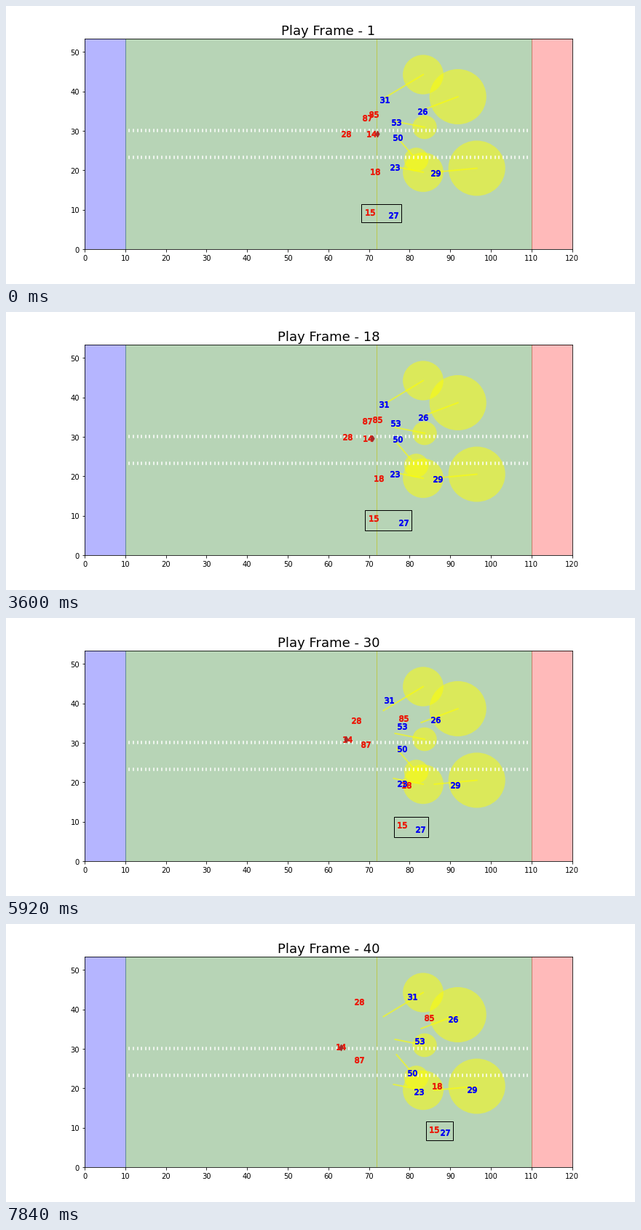
Write a matplotlib script that moves like this. It is 864 px wide and 383 px high and loops after 8000 ms.

```python
import numpy as np
import matplotlib.pyplot as plt
from matplotlib.animation import FuncAnimation
from matplotlib.patches import Circle, Rectangle
from matplotlib.transforms import ScaledTranslation

W, H, DPI = 864, 383, 72
LEFT, BASE, FIELD_W, FIELD_H = 108, 335.03, 669.6, 289.73
YARDS_X, YARDS_Y = 120, 53.3

TICK, TICKS = 80, 100            # ms per drawn frame, drawn frames per loop
HOLD, STEP = 480, 192.8          # time on the first play frame, then per frame
SNAP, LAST, EASE = 15, 40, 1.357

RED, BLUE = "#ea1c0c", "#0606f2"

# Stage points for each route: before the snap, halfway, end
ROUTES = {
    87: ((495.5, 154), (493.5, 174), (484.5, 187)),
    85: ((504.5, 149), (546.5, 138), (580.5, 129)),
    28: ((466.5, 176), (481.5, 141), (484.5, 107)),
    14: ((501.5, 176), (468.5, 167), (459.5, 169)),
    18: ((506.5, 228), (550.5, 230), (591.5, 223)),
    15: ((499.5, 283.5), (544.5, 285.2), (588.2, 283)),
    31: ((519.5, 128.5), (526.5, 113), (558, 100)),
    26: ((571.5, 145), (590.5, 140), (613.5, 131)),
    53: ((535.5, 160), (544.5, 149), (567.5, 161)),
    50: ((537.5, 181), (544.5, 180), (557.5, 205)),
    23: ((533.5, 222), (544.5, 228), (566.5, 231)),
    29: ((589.5, 230), (617.5, 230), (639.5, 228)),
    27: ((532, 287.5), (569, 291.2), (603.2, 287)),
}
BALL = ((510, 176), (467, 167), (459.5, 169.5))

# Drift of the players who move before the snap
SHIFTS = {87: (1, -8), 53: (-1, -5), 50: (0, -5), 27: (11.5, 2)}

# Defender: zone centre on the stage, radius in yards
ZONES = {
    31: ((573, 94.5), 5),
    26: ((620.7, 125), 7),
    53: ((575, 167), 3),
    50: ((563.5, 211.5), 3),
    23: ((573, 229), 5),
    29: ((646.7, 223.5), 7),
}


def to_yards(point):
    x, y = point
    return np.array([(x - LEFT) * YARDS_X / FIELD_W,
                     (BASE - y) * YARDS_Y / FIELD_H])


def position(route, n, shift=(0, 0)):
    """Drift until the snap, then run a speeding-up quadratic curve."""
    start, middle, end = np.array(route, float)
    start = start + np.array(shift) * min((n - 1) / (SNAP - 1), 1)
    control = 2 * middle - (start + end) / 2
    u = max(0, (n - SNAP) / (LAST - SNAP)) ** EASE
    return to_yards((1 - u) ** 2 * start + 2 * u * (1 - u) * control
                    + u * u * end)


def player(number, n):
    return position(ROUTES[number], n, SHIFTS.get(number, (0, 0)))


def play_frame(tick):
    late = tick * TICK - HOLD
    return 1 if late < 0 else 2 + int(late // STEP)


def draw_field(ax):
    for start, end, color in ((0, 10, "#0a0aff"), (10, 110, "#12730f"),
                              (110, 120, "#ff1c1c")):
        ax.add_patch(Rectangle((start, 0), end - start, YARDS_Y,
                               color=color, alpha=0.3, lw=1, zorder=0.5))
    ax.axvline(71.8, color="y", lw=1, alpha=0.55, zorder=1)
    marks = np.arange(11, 110)
    for low, high in ((22.91, 23.57), (29.73, 30.39)):
        ax.vlines(marks, low, high, color="white", lw=1.5,
                  capstyle="projecting", zorder=2.5)


def draw_zones(ax):
    for number, (center, radius) in ZONES.items():
        start = to_yards(np.array(ROUTES[number][0]) - 1)
        center = to_yards(center)
        ax.add_patch(Circle(center, radius, fc="yellow", ec="none",
                            alpha=0.5, zorder=2))
        ax.plot(*zip(start, center), color="yellow", lw=2, alpha=0.6,
                zorder=2.2)


fig = plt.figure(figsize=(W / DPI, H / DPI), dpi=DPI, facecolor="white")
ax = fig.add_axes([LEFT / W, 1 - BASE / H, FIELD_W / W, FIELD_H / H])
ax.set(xlim=(0, YARDS_X), ylim=(0, YARDS_Y),
       xticks=range(0, 121, 10), yticks=range(0, 51, 10))
ax.tick_params(labelsize=10)
title = ax.set_title("", fontsize=18)

# All lettering sits a fraction of a pixel low.
drop = ScaledTranslation(0, -0.76 / DPI, fig.dpi_scale_trans)
for text in [title, *ax.get_xticklabels(), *ax.get_yticklabels()]:
    text.set_transform(text.get_transform() + drop)

draw_field(ax)
draw_zones(ax)

dots = {}
for number in ROUTES:
    color = BLUE if number in ZONES or number == 27 else RED
    dots[number] = ax.scatter([0], [0], marker=f"${number}$", s=144,
                              color=color, lw=1, zorder=3)
ball = ax.scatter([0], [0], marker="d", s=36, color="brown", lw=1, zorder=4)

box = Rectangle((0, 0), 1, 1, fill=False, ec="black", lw=1, zorder=3)
ax.add_patch(box)


def update(tick):
    n = play_frame(tick)
    title.set_text(f"Play Frame - {n}")
    for number, dot in dots.items():
        dot.set_offsets([player(number, n)])
    ball.set_offsets([position(BALL, n)])
    pair = np.array([player(15, n), player(27, n)])
    low, high = pair.min(axis=0) - 2, pair.max(axis=0) + 2
    box.set_bounds(*low, *(high - low))
    return [title, box, ball, *dots.values()]


anim = FuncAnimation(fig, update, frames=TICKS, interval=TICK,
                     repeat=True, repeat_delay=0, blit=False)
plt.show()
```
